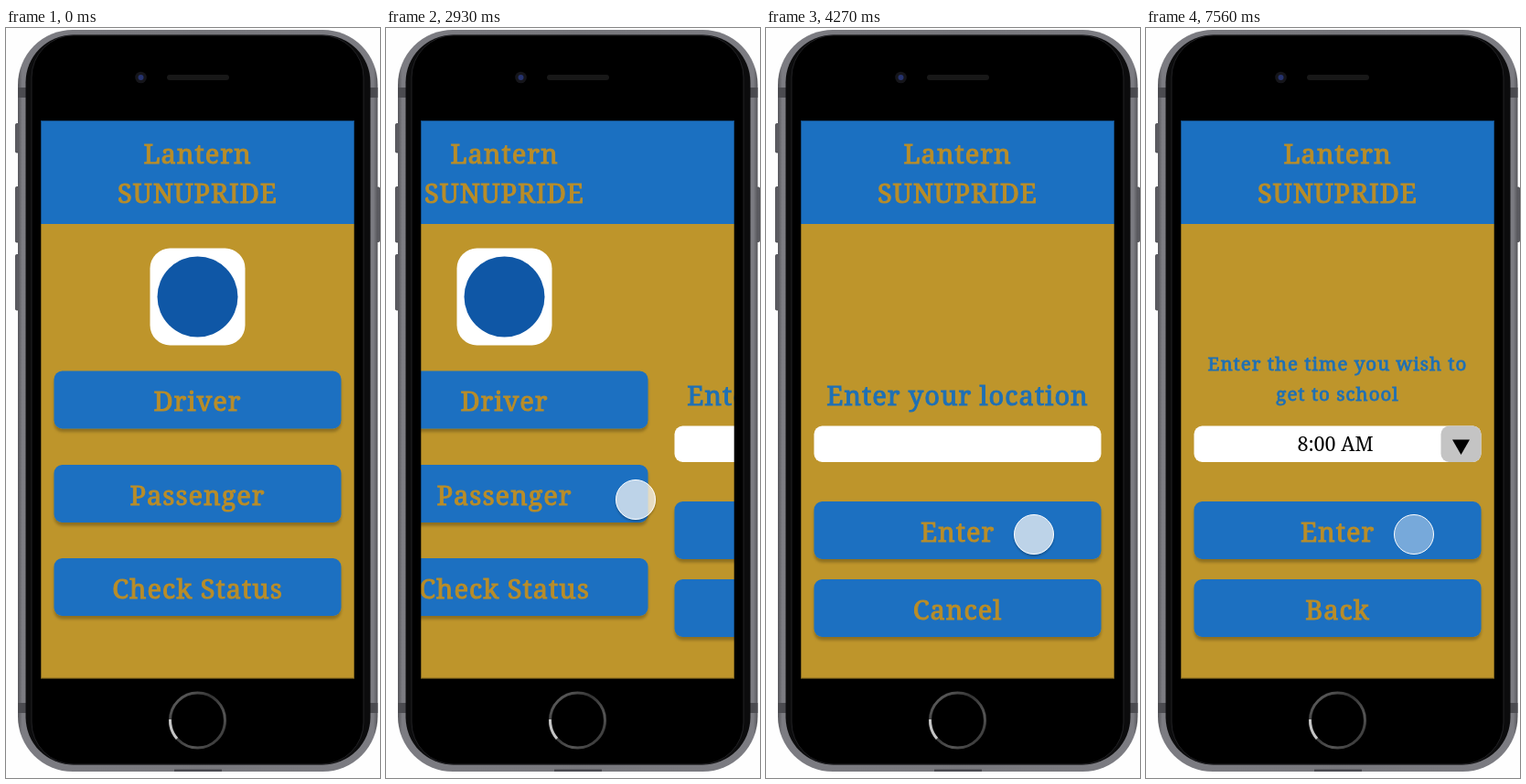
Recreate the animation shown at these times as an HTML page. Size 409x819 px, loop 8 s.

```html
<!DOCTYPE html>
<html lang="en">
<head>
<meta charset="utf-8">
<title>Ride app prototype</title>
<style>
  html, body { margin: 0; width: 100%; height: 100%; overflow: hidden; background: #fefefe; }
  svg { display: block; width: 409px; height: 819px; }
  text { font: 29px "Noto Serif", serif; letter-spacing: 1px; text-anchor: middle; fill: #b98d28; stroke: #b98d28; stroke-width: 1; }
  .label { fill: #1e70b6; stroke: #1e70b6; }
  .small { font-size: 20.5px; stroke-width: .8; }
  .value { font-size: 21.5px; letter-spacing: 0; fill: #000; stroke: none; }
</style>
</head>
<body>
<svg viewBox="0 0 409 819">
  <defs>
    <linearGradient id="rim">
      <stop offset="0" stop-color="#55555a"/>
      <stop offset=".012" stop-color="#7c7c82"/>
      <stop offset=".5" stop-color="#77777c"/>
      <stop offset=".988" stop-color="#7c7c82"/>
      <stop offset="1" stop-color="#55555a"/>
    </linearGradient>
    <linearGradient id="ring" x1="0" y1="0" x2="1" y2="1">
      <stop offset="0" stop-color="#6a6a6a"/>
      <stop offset=".4" stop-color="#333"/>
      <stop offset=".7" stop-color="#555"/>
      <stop offset="1" stop-color="#2a2a2a"/>
    </linearGradient>
    <filter id="drop" x="-20%" y="-20%" width="140%" height="160%">
      <feDropShadow dx="0" dy="3.6" stdDeviation="1.8" flood-opacity=".25"/>
    </filter>
    <filter id="touchShadow" x="-20%" y="-20%" width="140%" height="150%">
      <feDropShadow dx="0" dy="2" stdDeviation="1.2" flood-opacity=".3"/>
    </filter>
    <clipPath id="screen"><rect x="38" y="101" width="343" height="609.5"/></clipPath>
  </defs>

  <g id="phone">
    <g fill="#5c5c62" stroke="#3b3b40" stroke-width=".8">
      <rect x="10.5" y="104.5" width="6" height="31.5" rx="1"/>
      <rect x="10.5" y="173.5" width="6" height="60.5" rx="1"/>
      <rect x="10.5" y="247.5" width="6" height="60.5" rx="1"/>
      <rect x="402.5" y="174" width="6" height="59.5" rx="1"/>
    </g>
    <rect x="13" y="2" width="393.5" height="810" rx="60" fill="url(#rim)"/>
    <g fill="#4b4b50">
      <rect x="13" y="65" width="9" height="11"/><rect x="398" y="65" width="8.5" height="11"/>
      <rect x="13" y="737" width="9" height="11"/><rect x="398" y="737" width="8.5" height="11"/>
      <rect x="184" y="809.5" width="52" height="2.5"/>
    </g>
    <rect x="21.5" y="7.5" width="377" height="797" rx="52" fill="#0c0c0d"/>
    <rect x="28" y="8" width="363" height="796" rx="46" stroke="#29292c" stroke-width=".8"/>
    <circle cx="147.5" cy="54" r="6.3" fill="#15151a"/>
    <circle cx="147.5" cy="54" r="3" fill="#26336f"/>
    <rect x="176" y="51" width="68" height="6" rx="3" fill="#181818"/>
    <g fill="none" stroke-width="3">
      <circle cx="209.5" cy="756" r="30" stroke="url(#ring)"/>
      <path d="M179.5 755A30 30 0 0 0 187 776" stroke="#c4c4c4"/>
    </g>
  </g>

  <g clip-path="url(#screen)">
    <rect x="38" y="101" width="343" height="610" fill="#be952b"/>
    <rect x="38" y="101" width="343" height="113" fill="#1b70c1"/>
    <g id="pages"></g>
  </g>
  <rect x="38.5" y="101.5" width="342" height="608.5" fill="none" stroke="#000" stroke-opacity=".3"/>

  <path id="arrow" d="M0 0V14.5L3.4 11.3 5.7 16.7 8.3 15.6 6 10.3H10.5Z" fill="#000" stroke="#fff" stroke-width="1.1"/>
  <circle id="touch" r="21.5" fill="#fff" stroke="#fff" stroke-width="1"/>
</svg>

<script>
const LOOP = 8000, PAGE_WIDTH = 343, CENTER = 209.5;
const byId = id => document.getElementById(id);

const text = (label, y, cls = "") => `<text x="${CENTER}" y="${y}" class="${cls}">${label}</text>`;
const box = (x, y, w, h, fill, extra = "") =>
  `<rect x="${x}" y="${y}" width="${w}" height="${h}" rx="9" fill="${fill}" ${extra}/>`;
const button = (label, y) =>
  box(52.5, y, 314, 63, "#1b70c1", 'filter="url(#drop)"') + text(label, y + 43.5);
const field = box(52.5, 434.5, 314, 39.5, "#fff");
const title = text("Lantern", 148) + text("SUNUPRIDE", 191);

const pages = [
  '<rect x="157.5" y="240.5" width="104" height="106" rx="22" fill="#fff"/>' +
    '<circle cx="209.5" cy="293.5" r="44" fill="#0f57a6"/>' +
    button("Driver", 374.5) + button("Passenger", 477) + button("Check Status", 579),
  text("Enter your location", 412, "label") + field + button("Enter", 517) + button("Cancel", 602),
  text("Enter the time you wish to", 373.5, "label small") + text("get to school", 407, "label small") +
    field + box(322.5, 434.5, 44, 39.5, "#c4c4c4") + '<path d="M335 449.5H354L344.5 466Z"/>' +
    '<text x="207" y="462" class="value">8:00 AM</text>' +
    button("Enter", 517) + button("Back", 602)
];
byId("pages").innerHTML = pages
  .map((body, i) => `<g transform="translate(${i * PAGE_WIDTH})">${title}${body}</g>`).join("");

// [start ms, value...]; each entry holds until the next.
const scroll = [
  [0, 0], [2930, 80], [3080, 295], [3230, 343],
  [6360, 423], [6510, 638], [6660, 686]
];
const arrowSteps = [[0, null], [1490, 284.5, 548], [1640, 283.5, 547], [1790, null]];
const touchSteps = [
  [0, null], [1790, 281, 536], [1920, 281, 535], [2050, 281, 534],
  [2190, 272.5, 522], [2490, 273, 518], [2640, 273, 515],
  [3530, 278, 496], [3680, 284, 498], [3820, 285, 535],
  [3970, 288, 542], [4120, 290, 546], [4270, 293, 553]
];
const presses = [[2780, 2930], [6070, 6360], [7560, LOOP]];

const stepAt = (steps, t) => steps.findLast(([start]) => start <= t);

function place(node, [, x, y]) {
  node.setAttribute("visibility", x === null ? "hidden" : "visible");
  if (x !== null) node.setAttribute("transform", `translate(${x} ${y})`);
}

function draw(t) {
  byId("pages").setAttribute("transform", `translate(${-stepAt(scroll, t)[1]})`);
  place(byId("arrow"), stepAt(arrowSteps, t));
  const touch = byId("touch");
  place(touch, stepAt(touchSteps, t));
  const pressed = presses.some(([from, to]) => t >= from && t < to);
  touch.setAttribute("fill-opacity", pressed ? 0.4 : 0.68);
  touch.setAttribute("filter", pressed ? "none" : "url(#touchShadow)");
}

const begin = performance.now();
function tick() {
  draw((performance.now() - begin) % LOOP);
  requestAnimationFrame(tick);
}
tick();
</script>
</body>
</html>
```
